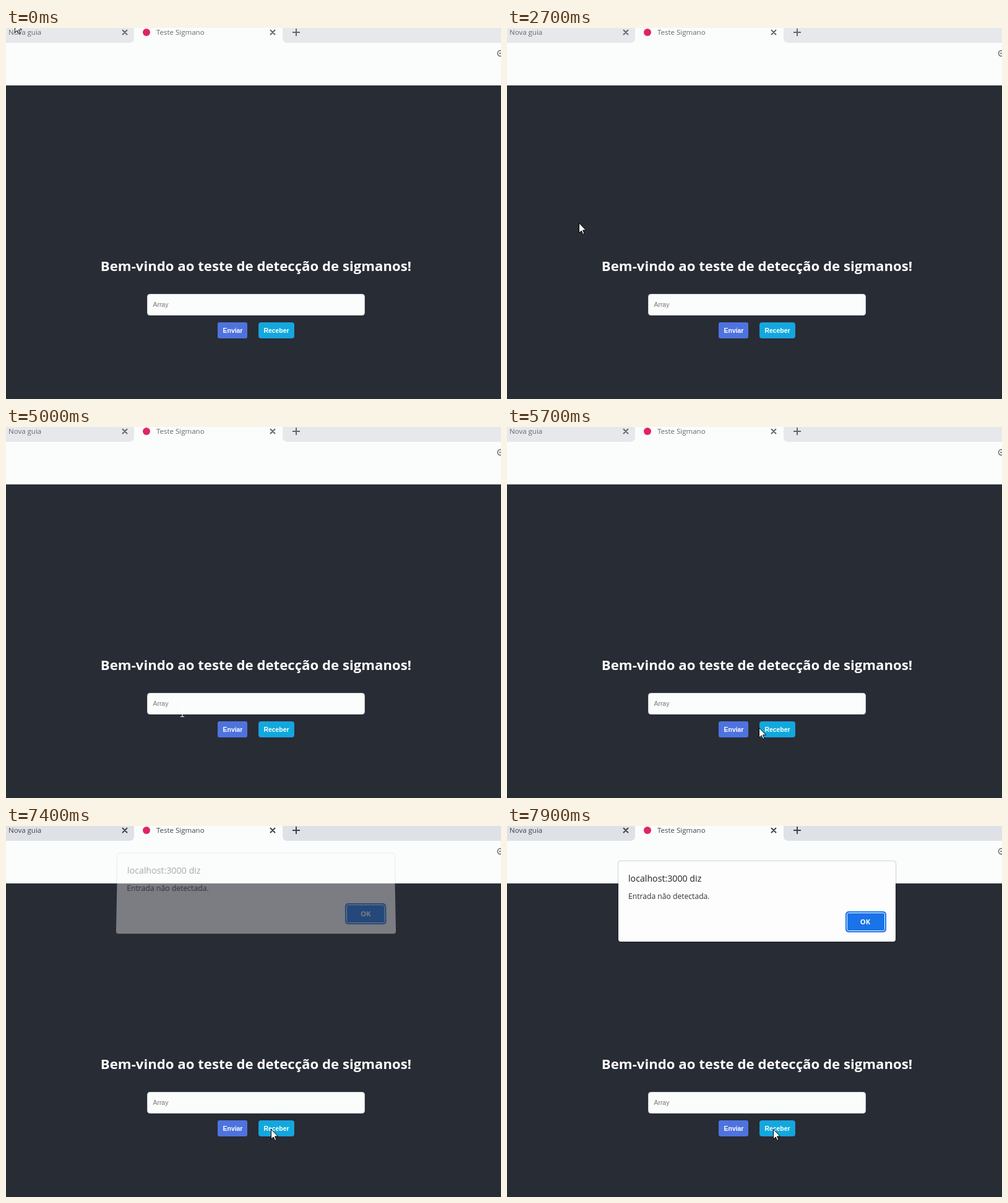
Recreate the animation shown at these times as an HTML page. Size 800 px wide and 600 px high, loop 8 s.

```html
<!DOCTYPE html>
<html lang="pt">
<head>
<meta charset="utf-8">
<title>Teste Sigmano</title>
<style>
  html, body { margin: 0; width: 100%; height: 100%; overflow: hidden; background: #282c34; }
  svg { display: block; position: absolute; left: 0; top: 0; }
  text { font-family: "Open Sans", "Noto Sans", sans-serif; }
  .form { font-family: "Liberation Sans", Arial, sans-serif; font-size: 10.4px; }
  .label { font-weight: bold; fill: #fff; text-anchor: middle; }
  #stage { --strip: #e7e8ec; --ink: #63676b; }
  #stage.focused { --strip: #dee1e6; --ink: #404347; }
  .strip { fill: var(--strip); }
  .tab { font-size: 11.5px; fill: var(--ink); }
  .icon { fill: none; stroke: var(--ink); stroke-width: 2; }
  #dialog {
    position: absolute; left: 180px; top: 57px; width: 448px; height: 130px;
    border-radius: 4px; background: #fdfdfd; box-shadow: 0 0 2px rgba(0, 0, 0, .55);
  }
  #dialog.opening {
    opacity: .39;
    transform: perspective(1000px) translate3d(0, -13px, 4px) rotateX(5deg);
  }
</style>
</head>
<body>
<svg id="stage" width="800" height="600">
  <rect width="800" height="600" fill="#282c34"/>
  <rect width="800" height="93" fill="#dadce0"/>
  <rect width="800" height="92" fill="#fbfdfc"/>
  <path class="strip" d="M0 0H207V16Q207 24 199 24H0ZM447 0H800V24H455Q447 24 447 16Z"/>
  <text class="tab" x="4" y="11">Nova guia</text>
  <text class="tab" x="243" y="11">Teste Sigmano</text>
  <circle cx="227" cy="7" r="6" fill="#e0265f"/>
  <path class="icon" d="M188 3l8 8m0-8l-8 8M427 3l8 8m0-8l-8 8M463 7h12M469 1v12"/>
  <g fill="none" stroke="#5f6368" stroke-width="1.5">
    <circle cx="799" cy="41" r="4.5"/>
    <path d="M797 41h3"/>
  </g>

  <text x="404" y="393" font-size="22.2" font-weight="bold" fill="#fff" text-anchor="middle">Bem-vindo ao teste de detecção de sigmanos!</text>
  <rect x="228.5" y="430.5" width="351" height="34" rx="4" fill="#fbfdfc" stroke="#ced4da"/>
  <text class="form" x="237.5" y="451" fill="#757575">Array</text>
  <rect x="342" y="476" width="48" height="26" rx="3" fill="#4e73df"/>
  <text class="form label" x="366.5" y="493">Enviar</text>
  <rect x="408.5" y="476.5" width="57" height="25" rx="3" fill="#11a8dd" stroke="#2e90de"/>
  <text class="form label" x="437" y="493">Receber</text>

  <g id="cursor">
    <path id="arrow" d="M.5 .5V16.5L4.2 13 6.8 18.5 9 17.6 6.5 12H11.5Z" fill="#fff" stroke="#000"/>
    <path id="beam" d="M-3 -8.5H3M0 -8V7M-3 7.5H3" fill="none" stroke="#fff"/>
  </g>
</svg>

<div id="dialog">
  <svg width="448" height="130">
    <text x="16" y="33" font-size="14.2" fill="#202124">localhost:3000 diz</text>
    <text x="16" y="61" font-size="12.15" fill="#303134">Entrada não detectada.</text>
    <rect x="367" y="81" width="66" height="34" rx="5" fill="#1a73e8"/>
    <rect x="369.5" y="83.5" width="61" height="29" rx="3" fill="none" stroke="#fff"/>
    <text class="label" x="399" y="102" font-size="11.2">OK</text>
  </svg>
</div>

<script>
const LOOP = 8000, STEP = 100, FOCUS = 6900, OPEN = 7400;

const byId = id => document.getElementById(id);
const show = (id, on) => { byId(id).style.visibility = on ? "visible" : "hidden"; };
const point = (x, y) => ({ x, y });

// Each move is one arc of the hand; the pointer rests at its end until the next.
const restLeft = point(136, 316), belowInput = point(280, 476);
const inInput = point(285, 459), onButton = point(428, 490);
const moves = [
  { start: 600, end: 1000, from: point(14, -9), bend: point(10, -12), to: point(9, -24) },
  { start: 2700, end: 3100, from: point(116, 315), bend: point(130, 265), to: restLeft },
  { start: 3200, end: 4100, from: restLeft, bend: point(260, 636), to: belowInput },
  { start: 4200, end: 5100, from: belowInput, bend: point(285, 466), to: inInput },
  { start: 5200, end: 5800, from: inInput, bend: point(365, 478), to: onButton },
  { start: 7800, end: 7900, from: onButton, bend: onButton, to: point(430, 490) },
];

function pointerAt(t) {
  const { start, end, from, bend, to } = moves.findLast(m => m.start <= t) || moves[0];
  const k = Math.min(1, Math.max(0, (t - start) / (end - start)));
  const arc = axis => Math.round(
    (1 - k) ** 2 * from[axis] + 2 * k * (1 - k) * bend[axis] + k * k * to[axis]);
  return point(arc("x"), arc("y"));
}

function draw(t) {
  const { x, y } = pointerAt(t);
  const overInput = x >= 228 && x < 580 && y >= 430 && y < 465;
  byId("cursor").setAttribute("transform", `translate(${x} ${y})`);
  show("arrow", !overInput);
  show("beam", overInput);

  byId("stage").classList.toggle("focused", t >= FOCUS);
  show("dialog", t >= OPEN);
  byId("dialog").classList.toggle("opening", t < OPEN + STEP);
}

function tick() {
  draw(Math.floor(performance.now() % LOOP / STEP) * STEP);
  requestAnimationFrame(tick);
}
tick();
</script>
</body>
</html>
```
